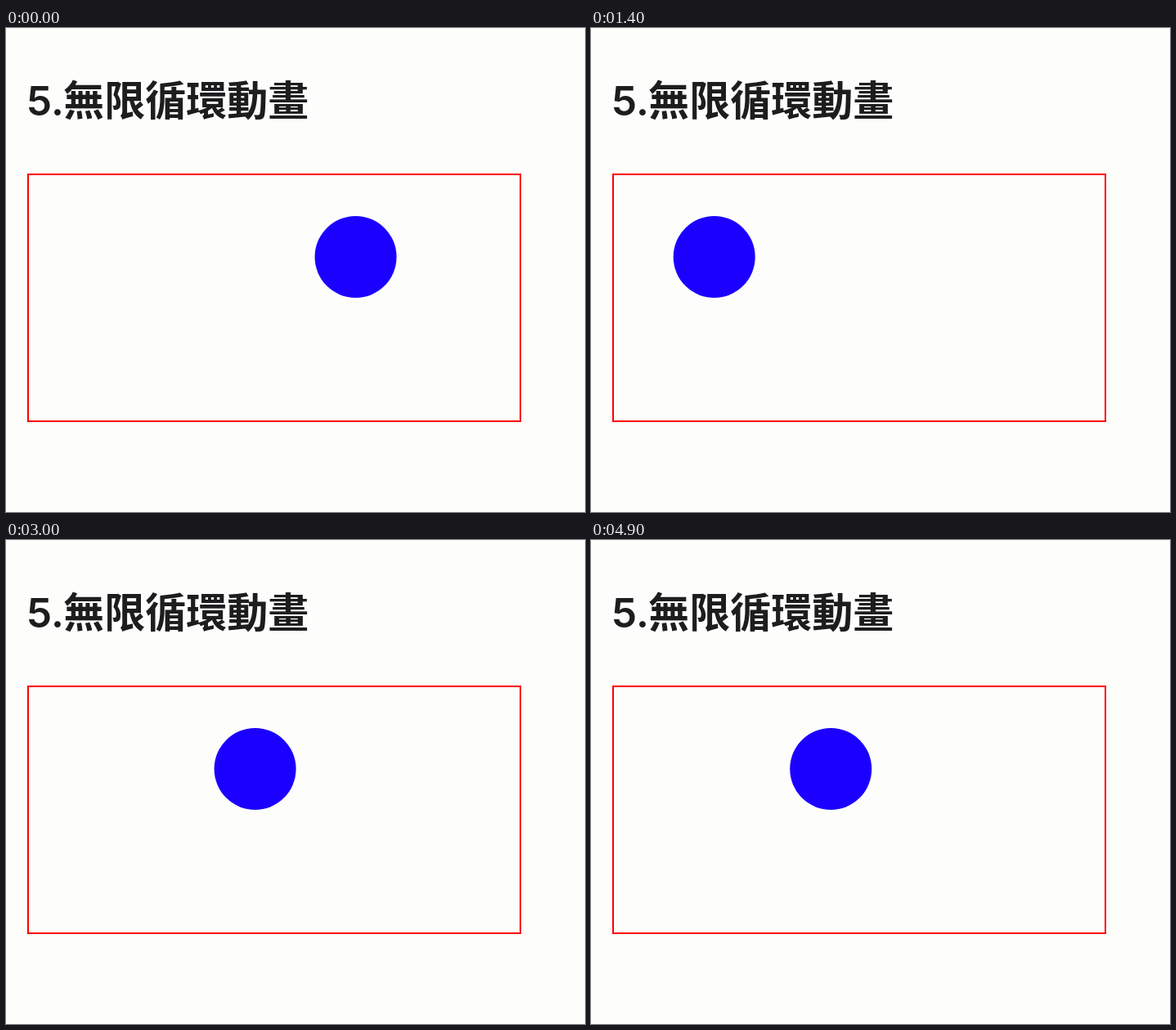
An HTML page for the animation above (5 s loop, 708 px wide and 592 px high).

```html
<!DOCTYPE html>
<html lang="zh-Hant">
<head>
<meta charset="utf-8">
<title>無限循環動畫</title>
<style>
  html, body { margin: 0; width: 100%; height: 100%; overflow: hidden; background: #fdfdfc; }
  svg { display: block; }
  text { font-size: 50px; fill: #1d1d1f; }
  .num { font-family: Inter, sans-serif; font-weight: 600; }
  .han { font-family: "Noto Sans CJK TC", "Noto Sans CJK", "Noto Sans TC", sans-serif; font-weight: 700; }
</style>
</head>
<body>
<svg width="708" height="592" viewBox="0 0 708 592">
  <text class="num" x="25.5" y="107">5.</text>
  <text class="han" x="70.3" y="106.5">無限循環動畫</text>
  <rect x="27" y="179" width="602" height="302" fill="none" stroke="#f00" stroke-width="2"/>
  <circle id="ball" cx="427.6" cy="280" r="50" fill="#1c00ff"/>
</svg>
<script>
  const LOOP = 5000, TICK = 100;   // the picture advances ten times a second
  const LEG = 2000, LEAD = 64;     // one sweep, and how far in the loop begins
  const LEFT = 127.6, RIGHT = 427.6;
  const ball = document.getElementById("ball");
  const start = performance.now();

  const easeInOut = x => x < 0.5 ? 4 * x ** 3 : 1 - 4 * (1 - x) ** 3;

  function ballX(t) {
    const legs = (t + LEAD) / LEG;
    const p = easeInOut(legs % 1);
    const back = Math.floor(legs) % 2;
    return RIGHT + (LEFT - RIGHT) * (back ? 1 - p : p);
  }

  function draw(now) {
    const t = Math.max(0, now - start) % LOOP;
    ball.setAttribute("cx", ballX(Math.floor(t / TICK) * TICK).toFixed(2));
    requestAnimationFrame(draw);
  }
  draw(start);
</script>
</body>
</html>
```
